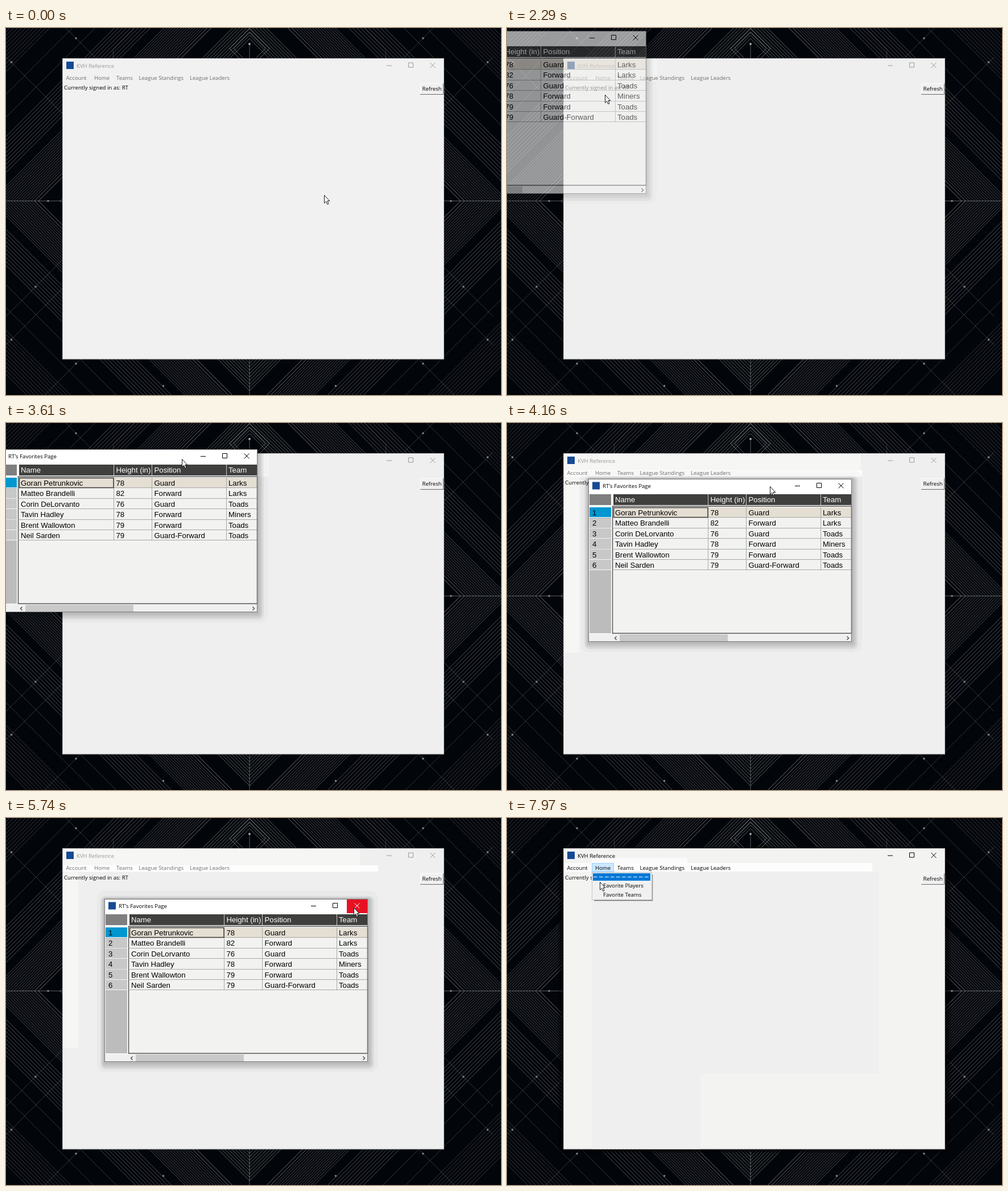
Animation of 870 by 644 pixels, one loop 8 s. Source, as an HTML page:

```html
<!DOCTYPE html>
<html lang="en">
<head>
<meta charset="utf-8">
<title>Favorites window</title>
<style>
  html, body { margin: 0; width: 100%; height: 100%; overflow: hidden; background: #02050a; }
  svg { display: block; width: 870px; height: 644px; }
  text { white-space: pre; }
  .ui { font: 9.6px "Open Sans", "Noto Sans", sans-serif; }
  .cell { font: 13.2px "Liberation Sans", Arial, sans-serif; }
</style>
</head>
<body>
<svg id="stage" viewBox="0 0 870 644"></svg>
<script>
const LOOP = 8000;
const stage = document.getElementById('stage');

function el(parent, tag, attrs = {}) {
  const node = document.createElementNS('http://www.w3.org/2000/svg', tag);
  for (const k in attrs) node.setAttribute(k, attrs[k]);
  return parent.appendChild(node);
}
const group = (p, a) => el(p, 'g', a);
const rect = (p, x, y, width, height, fill, more) => el(p, 'rect', { x, y, width, height, fill, ...more });
const path = (p, d, stroke, more) => el(p, 'path', { d, stroke, fill: 'none', ...more });
function text(p, x, y, str, cls, fill) {
  const node = el(p, 'text', { x, y, class: cls, fill });
  node.textContent = str;
  return node;
}
const show = (node, on) => node.setAttribute('visibility', on ? 'visible' : 'hidden');

// Last row of a step table whose time has come
function at(rows, t) {
  let found = rows[0];
  for (const row of rows) if (row[0] <= t) found = row;
  return found;
}

function drawWallpaper() {
  const g = group(stage);
  rect(g, 0, 0, 870, 644, '#02050a');
  const cx = 428, cy = 303.5;
  const diamond = (r, alpha, y = cy) =>
    path(g, `M${cx - r} ${y}L${cx} ${y - r}L${cx + r} ${y}L${cx} ${y + r}Z`, '#aeb2b5', { 'stroke-opacity': alpha });
  // from, to, step, opacity
  const bands = [
    [285, 335, 6, .55], [371, 379, 7, .65], [384, 455, 5, .42],
    [478, 545, 7, .45], [575, 575, 1, .3], [615, 615, 1, .28], [655, 735, 7, .32]
  ];
  for (const [from, to, step, alpha] of bands)
    for (let r = from; r <= to; r += step) diamond(r, alpha);
  diamond(35, .6, 36);
  diamond(28, .5, 36);
  path(g, `M0 ${cy}H870M${cx} 28V644`, '#aeb2b5', { 'stroke-opacity': .5 });

  // Details mirrored left and right
  const half = 'M188.5 60V38L226 0M105 0L160 55M0 51L99 150M0 506L99 407M0 556L99 457M68 644L135 577';
  const dots = [[123, 18], [9.5, 60], [9.5, 547], [123, 589], [276.5, 628], [52, 454], [74, cy]];
  for (const flip of ['', `translate(${cx * 2} 0) scale(-1 1)`]) {
    const side = group(g, { transform: flip });
    path(side, half, '#aeb2b5', { 'stroke-opacity': .28 });
    for (const [x, y] of dots) el(side, 'circle', { cx: x, cy: y, r: 1.8, fill: '#808486' });
  }
  el(g, 'circle', { cx, cy: 28, r: 2, fill: '#a0a3a5' });
}

// Minimise, maximise and close, placed from the right edge
function windowButtons(p, right, mid) {
  const g = group(p, { stroke: '#000', fill: 'none' });
  const x = right - 101;
  el(g, 'path', { d: `M${x} ${mid + .5}h9` });
  el(g, 'path', { d: `M${x + 38.5} ${mid - 4.5}h8v8h-8z` });
  const close = el(g, 'path', { d: `M${x + 76.5} ${mid - 4.5}l9 9m0-9l-9 9` });
  return { g, close };
}

const LIGHT = '#f3f3f1', DULL = '#efefef';

function buildMain() {
  const g = group(stage);
  const shade = group(g);
  for (let k = 1; k < 6; k++)
    rect(shade, 99 - k * 2, 53 - k + 2, 671 + k * 4, 528 + k * 2, '#000', { opacity: .18, rx: 4 });
  const body = rect(g, 99.5, 53.5, 670, 527.5, DULL, { stroke: '#b9bbbc' });

  // Areas that stay lighter or duller: start, end, x, y, w, h, colour
  const tones = [
    [2290, 3470, 245, 54, 19, 40, '#f5f5f4'],
    [3470, 3760, 443, 55, 18, 39, '#f8f8f8'],
    [4160, 6320, 100, 54, 522, 41, '#f6f6f4'],
    [4160, 4610, 100, 83, 524, 11, '#fdfdfd'],
    [4610, 6320, 100, 83, 554, 11, '#fdfdfd'],
    [4160, 6320, 100, 95, 27, 308, '#f6f6f4'],
    [6320, LOOP, 149, 94, 505, 354, DULL],
    [7560, LOOP, 149, 448, 191, 133, DULL],
    [6320, LOOP, 100, 79, 542, 15, '#fdfdfd'],
    [7560, LOOP, 149, 70, 168, 9, '#fbfbfb']
  ].map(([a, b, ...box]) => ({ a, b, node: rect(g, ...box) }));

  rect(g, 106, 59, 13, 13, '#174a94');
  const home = rect(g, 149.5, 79.5, 38, 15, '#cce8ff', { stroke: '#99d1ff' });
  const title = text(g, 124, 69.5, 'KVH Reference', 'ui');
  const labels = [[105.5, 'Account'], [155, 'Home'], [194, 'Teams'], [233.5, 'League Standings'], [323, 'League Leaders']]
    .map(([x, s]) => text(g, x, 90.5, s, 'ui'));
  text(g, 102, 108, 'Currently signed in as: RT', 'ui', '#000');
  const buttons = windowButtons(g, 770, 65.5);

  rect(g, 728, 97, 41, 20, '#f0f0f0');
  path(g, 'M728.5 116V97.5H768', '#fff');
  path(g, 'M728 116.5H768.5V97', '#696969');
  text(g, 731.5, 109.5, 'Refresh', 'ui', '#000');

  return (t, menuOpen) => {
    const active = t >= 1140 && t < 2290 || t >= 6320;
    body.setAttribute('fill', t < 2290 ? '#f1f1f1' : t < 6320 ? DULL : LIGHT);
    show(shade, active);
    show(home, menuOpen);
    for (const { a, b, node } of tones) show(node, t >= a && t < b);
    title.setAttribute('fill', active ? '#000' : '#999');
    for (const label of labels) label.setAttribute('fill', active ? '#000' : '#6d6d6d');
    buttons.g.setAttribute('stroke', active ? '#000' : '#999');
  };
}

function buildMenu() {
  const g = group(stage);
  rect(g, 153, 99, 103.5, 47, '#000', { opacity: .2 });
  rect(g, 153, 99, 102.5, 46, '#000', { opacity: .4 });
  rect(g, 149.5, 95.5, 105, 48, '#f1f1f1', { stroke: '#c4c4c4' });
  const bar = rect(g, 151, 97, 101, 13, '#0078d7');
  const dashes = path(g, 'M152 103.5H249', '#a0a0a0', { 'stroke-dasharray': '6.5 3.5' });
  const players = text(g, 169, 121.5, 'Favorite Players', 'ui');
  text(g, 169, 137.5, 'Favorite Teams', 'ui', '#000');

  return (opacity, row) => {
    g.setAttribute('opacity', opacity);
    show(g, opacity > 0);
    bar.setAttribute('opacity', row ? 1 : 0);
    bar.setAttribute('y', row === 2 ? 110 : 97);
    bar.setAttribute('height', row === 2 ? 16 : 13);
    dashes.setAttribute('stroke', row === 1 ? '#fff' : '#a0a0a0');
    players.setAttribute('fill', row === 2 ? '#fff' : '#000');
  };
}

function buildPopup() {
  const W = 463, H = 286, ROW = 18.4, TOP = 50;
  const rows = [
    ['Goran Petrunkovic', 78, 'Guard', 'Larks'],
    ['Matteo Brandelli', 82, 'Forward', 'Larks'],
    ['Corin DeLorvanto', 76, 'Guard', 'Toads'],
    ['Tavin Hadley', 78, 'Forward', 'Miners'],
    ['Brent Wallowton', 79, 'Forward', 'Toads'],
    ['Neil Sarden', 79, 'Guard-Forward', 'Toads']
  ];
  const textX = [47, 214.5, 281.5, 412], lineX = [210.5, 277.5, 408.5];
  const g = group(stage);

  // left, top, right and bottom reach of each shadow layer
  const layers = [[13, 14, 18, 18, 14], [7, 5, 11, 13, 9], [5, 3, 8, 10, 7], [3, 2, 6, 7, 5], [2, 1, 3, 4, 3]];
  layers.forEach(([l, t, r, b, rx], i) =>
    rect(g, -l, -t, W + l + r, H + t + b, '#000', { rx, opacity: i ? .055 : .025 }));

  rect(g, 0, 0, W, H, '#fff');
  rect(g, 7, 5.5, 13, 13, '#174a94');
  text(g, 25, 16, 'RT\u2019s Favorites Page'.replace('\u2019', "'"), 'ui', '#000');
  const red = rect(g, 426, 0, 37, 25, '#e81123');
  const buttons = windowButtons(g, W + 1, 12);

  // Headings
  rect(g, 2, 27, 38, 19, '#7f7f7f');
  rect(g, 44, 27, 418, 19, '#3f3f3d');
  ['Name', 'Height (in)', 'Position', 'Team'].forEach((s, i) => text(g, textX[i], 41, s, 'cell', '#fff'));
  for (const x of lineX) path(g, `M${x} 27V46`, '#c9cbca');

  // Row numbers and body
  rect(g, 2, TOP, 38, 221, '#bcbcbc');
  rect(g, 43, 48, 419, 223, '#f2f2f0');
  rect(g, 44, TOP, 418, ROW, '#e5ded3');
  rows.forEach((row, i) => {
    const y = TOP + ROW * i, base = y + 14;
    rect(g, 2, y, 38, ROW, i ? '#c8c8c8' : '#0096cf');
    path(g, `M2 ${Math.round(y + ROW) - .5}H40`, '#f4f4f4');
    text(g, 7, base, i + 1, 'cell', '#000');
    row.forEach((s, c) => text(g, textX[c], base, s, 'cell', '#000'));
    path(g, `M44 ${Math.round(y + ROW) - .5}H462`, '#a3abab');
  });
  for (const x of lineX) path(g, `M${x} ${TOP}V${TOP + ROW * rows.length}`, '#a3abab');
  rect(g, 44.5, TOP + .5, 165.5, 17, 'none', { stroke: '#3a3a3a', 'stroke-width': 1.5 });
  rect(g, 42.5, 48, 420, 223, 'none', { stroke: '#555', 'stroke-width': 1.5 });

  // Scroll bar
  rect(g, 1, 272, 461, 13.5, '#f0f0f0');
  rect(g, 55, 273, 190, 12, '#c9c9c9');
  path(g, 'M49.5 276.5l-3 3l3 3M454.5 276.5l3 3l-3 3', '#444', { 'stroke-width': 1.4 });
  rect(g, .5, .5, W - 1, H - 1, 'none', { stroke: '#74777a' });

  return (t, x, y) => {
    const open = t >= 2290 && t < 6320, hot = t >= 5740;
    show(g, open);
    g.setAttribute('transform', `translate(${x} ${y})`);
    g.setAttribute('opacity', t < 2420 ? .6 : t < 2560 ? .9 : t < 2690 ? .96 : 1);
    red.setAttribute('opacity', hot ? 1 : 0);
    buttons.close.setAttribute('stroke', hot ? '#fff' : '#000');
  };
}

// time, x, y
const cursorSteps = [
  [0, 559, 293], [300, 545, 283], [440, 480, 230], [580, 390, 170], [720, 290, 120], [870, 205, 95],
  [1000, 168, 86], [1140, 163, 84], [1420, 164, 100], [1570, 165, 108], [1710, 166, 113],
  [2290, 172, 117], [2420, 198, 132], [2560, 222, 147], [2690, 216, 121], [2820, 190, 80],
  [2950, 150, 45], [3080, 120, 28], [3200, 106, 20], [3320, 101, 18]
];
const dragSteps = [
  [0, -218, 5], [3470, -130, 24], [3610, -21, 46], [3760, 52, 70], [3890, 102, 86], [4020, 132, 95],
  [4160, 143, 98], [4610, 147, 103], [4750, 153, 114], [4890, 162, 128], [5030, 170, 138], [5170, 173, 142]
];
const leaveSteps = [
  [5310, 508, 155], [5450, 536, 153], [5590, 561, 153], [5740, 611, 157], [6460, 590, 152],
  [6600, 520, 142], [6740, 430, 128], [6880, 330, 112], [7010, 240, 98], [7150, 185, 89],
  [7290, 166, 84], [7830, 164, 98], [7970, 163, 112]
];
// time, opacity, highlighted row
const menuSteps = [
  [0, 0, 0], [1140, .65, 0], [1290, 1, 0], [1420, 1, 1], [1570, 1, 1], [1710, 1, 2],
  [2290, 0, 0], [7560, .65, 0], [7830, 1, 0], [7970, 1, 1]
];

function cursorAt(t, popX, popY) {
  if (t >= 5310) return at(leaveSteps, t).slice(1);
  if (t < 3470) return at(cursorSteps, t).slice(1);
  const lead = t < 4020 ? [330, 17] : [319, 13];
  return [popX + lead[0], popY + lead[1]];
}

drawWallpaper();
const drawMain = buildMain();
const drawMenu = buildMenu();
const drawPopup = buildPopup();
const cursor = el(stage, 'path', {
  d: 'M.5 .5V14.2L3.6 11.4L5.8 16.4L8 15.4L5.8 10.5H9.8Z', fill: '#fff', stroke: '#000', 'stroke-width': .9
});

let start;
function frame(now) {
  start ??= now;
  const t = (now - start) % LOOP;
  const [, popX, popY] = at(dragSteps, t);
  const [, opacity, row] = at(menuSteps, t);
  drawMain(t, opacity > 0);
  drawMenu(opacity, row);
  drawPopup(t, popX, popY);
  cursor.setAttribute('transform', `translate(${cursorAt(t, popX, popY)})`);
  requestAnimationFrame(frame);
}
requestAnimationFrame(frame);
</script>
</body>
</html>
```
